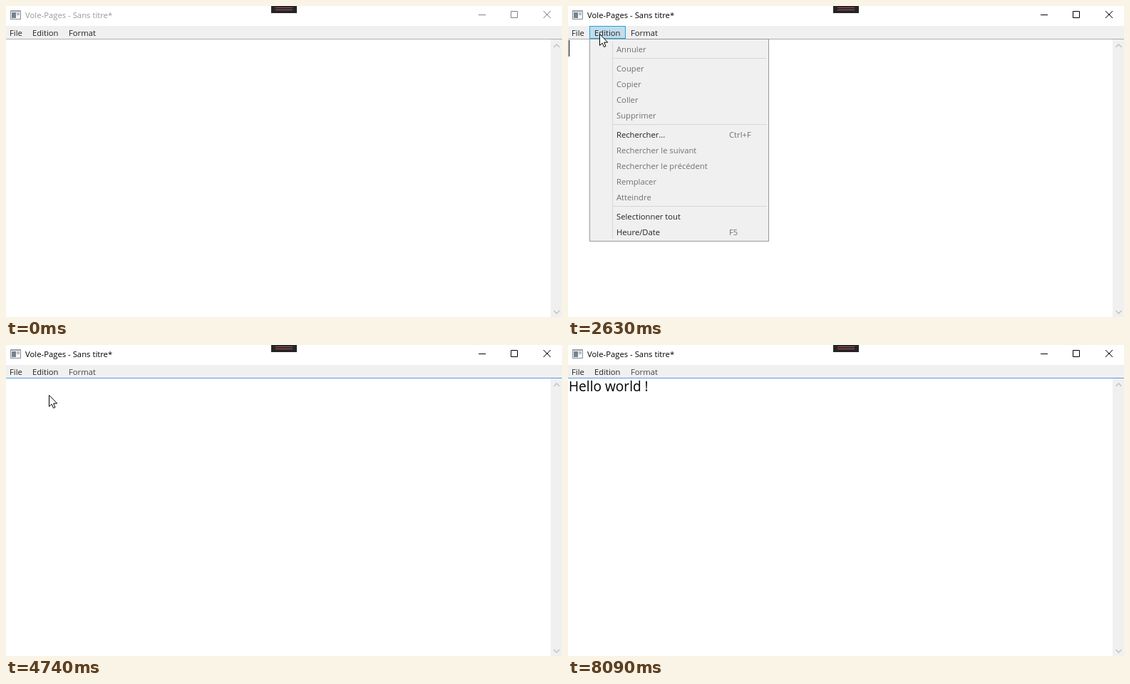
An HTML page for the animation above (8220 ms loop, 780 by 437 pixels).

```html
<!DOCTYPE html>
<html lang="fr">
<head>
<meta charset="utf-8">
<title>Vole-Pages</title>
<style>
html, body { margin: 0; width: 100%; height: 100%; overflow: hidden; background: #fff; }
svg { display: block; width: 100%; height: 100%; }
text { font: 11.25px "Open Sans", "Noto Sans", sans-serif; fill: #212121; white-space: pre; }
.off { fill: #707070; }
#title { font-size: 11.3px; }
#typed { font-size: 19.1px; fill: #000; }
.line { fill: none; stroke-width: 1; }
</style>
</head>
<body>
<svg viewBox="0 0 780 437" id="stage">
  <rect width="780" height="437" fill="#fff"/>
  <g id="icon">
    <rect x="6.5" y="6.5" width="14" height="12" fill="#f4f6f8" stroke="#8b9096"/>
    <rect x="6" y="6" width="15" height="2" fill="#9aa0a6"/>
    <rect x="8" y="9" width="6" height="8" fill="#75828f"/>
    <rect x="15" y="9" width="4" height="4" fill="#b9c0c7"/>
  </g>
  <text id="title" x="27" y="17">Vole-Pages - Sans titre*</text>
  <path id="buttons" class="line" d="M663 12.5h10M708.5 7.5h9v9h-9zM754 7l10 10M764 7l-10 10"/>
  <rect x="372" width="36" height="10" fill="#252526"/>
  <path class="line" stroke="#a8535b" d="M378 2.5h24M378 5.5h24"/>
  <rect y="28" width="780" height="18" fill="#f0f0f0"/>
  <rect id="glow" y="28.5" height="17" fill="#26a0da" fill-opacity=".24" stroke="#26a0da"/>
  <g id="bar"></g>
  <rect id="edge" y="46" width="780" height="1"/>
  <rect x="764" y="47" width="16" height="390" fill="#f0f0f0"/>
  <path class="line" stroke="#bfbfbf" style="stroke-width:1.3" d="M768.5 58l4-4 4 4M768.5 428l4 4 4-4"/>
  <text id="typed" x="1" y="65"></text>
  <rect id="caret" y="48" width="1" height="23"/>
  <g id="popups"></g>
  <path id="arrow" fill="#fff" stroke="#000" d="M.5 .5V16.5L4.1 13.1 6.6 18.6 9 17.5 6.6 12.1H11.7Z"/>
  <path id="beam" class="line" stroke="#000" d="M-3.5-7.5h3M.5-7.5h3M0-7V7M-3.5 7.5h3M.5 7.5h3"/>
</svg>
<script>
const LOOP = 8220;
const $ = id => document.getElementById(id);
const NS = "http://www.w3.org/2000/svg";

function add(parent, tag, attrs, text) {
  const el = document.createElementNS(NS, tag);
  for (const k in attrs) el.setAttribute(k, attrs[k]);
  if (text) el.textContent = text;
  parent.appendChild(el);
  return el;
}

// "-" is a separator, a leading "~" a disabled entry, "|" precedes the shortcut
const MENUS = [
  { name: "File", x: -2, w: 32, tx: 5, pw: 195, keys: 134,
    items: ["New File|Ctrl+N", "~New window", "Open...", "Save", "~Save as...", "-", "Exit|Ctrl+L"] },
  { name: "Edition", x: 30, w: 51, tx: 37, pw: 252, keys: 226,
    items: ["~Annuler", "-", "~Couper", "~Copier", "~Coller", "~Supprimer", "-", "Rechercher...|Ctrl+F",
      "~Rechercher le suivant", "~Rechercher le précédent", "~Remplacer", "~Atteindre", "-",
      "Selectionner tout", "Heure/Date|F5"] },
  { name: "Format", x: 81, w: 51, tx: 88, pw: 248, keys: 0,
    items: ["~Retour automatique à la ligne", "~Police", "~Editeur de style"] }
];

function build(menu) {
  menu.label = add($("bar"), "text", { x: menu.tx, y: 42 }, menu.name);
  const g = menu.popup = add($("popups"), "g", {});
  const seps = menu.items.filter(i => i === "-").length;
  const h = (menu.items.length - seps) * 22 + seps * 5 + 6;
  add(g, "rect", { x: menu.x + .5, y: 46.5, width: menu.pw - 1, height: h - 1 - (seps ? 0 : 0), fill: "#f0f0f0", stroke: "#999" });
  add(g, "rect", { x: menu.x + 32, y: 50, width: 1, height: h - 8, fill: "#d7d7d7" });
  let y = 50;
  for (const item of menu.items) {
    if (item === "-") {
      add(g, "rect", { x: menu.x + 33, y: y + 1, width: menu.pw - 36, height: 1, fill: "#d7d7d7" });
      y += 5;
      continue;
    }
    const [label, key] = item.replace("~", "").split("|");
    add(g, "text", { x: menu.x + 38, y: y + 15, class: item[0] === "~" ? "off" : "" }, label);
    if (key) add(g, "text", { x: menu.keys, y: y + 15, class: "off" }, key);
    y += 22;
  }
}
MENUS.forEach(build);

// Steps: [time, value...]
const POINTER = [
  [0, ""], [200, "beam", 14, 318], [270, "beam", 78, 285], [340, "beam", 136, 250], [410, "beam", 170, 235],
  [940, "beam", 164, 226], [1010, "beam", 140, 194], [1080, "beam", 104, 148], [1150, "beam", 66, 102],
  [1220, "beam", 36, 66], [1290, "arrow", 22, 45], [1350, "arrow", 19, 43], [1560, "arrow", 18, 42],
  [2560, "arrow", 34, 40], [2630, "arrow", 44, 39], [2700, "arrow", 45, 39],
  [3650, "arrow", 51, 39], [3720, "arrow", 66, 40], [3790, "arrow", 86, 41], [3860, "arrow", 102, 41],
  [3930, "arrow", 111, 41], [4390, "arrow", 109, 44], [4460, "arrow", 100, 50], [4530, "arrow", 88, 58],
  [4600, "arrow", 76, 64], [4660, "arrow", 65, 68], [4730, "arrow", 60, 70],
  [4800, "beam", 60.5, 70], [5000, "beam", 60.5, 72], [5800, ""]
];
const HOT = [[0, -1], [1350, 0], [2560, 1], [3790, 2], [4730, -1]];
const OPEN = [[0, -1], [1560, 0], [2560, 1], [3790, 2], [4730, -1]];
const FADE = [[0, 0], [1560, .08], [1630, .43], [1690, .73], [1760, 1]];
const EDGE = [[0, "#abadb3"], [200, "#7eb4ea"], [1350, "#abadb3"], [4730, "#569de5"]];
const CARET = [[0, 0], [1630, 1], [2130, 0], [2630, 1], [3190, 0], [3720, 1], [4260, 0],
  [4800, 1], [5400, 0], [5730, 1], [8090, 0]];
const PHRASE = "Hello world !";
const KEYS = [5730, 5870, 6000, 6150, 6350, 6630, 6830, 6930, 7030, 7130, 7230, 7430, 7480];

const at = (steps, t) => steps.findLast(s => s[0] <= t);
let shown = -1;

function draw(t) {
  const active = t >= 1560;
  $("title").style.fill = active ? "#000" : "#999";
  $("buttons").style.stroke = active ? "#000" : "#808080";
  $("edge").style.fill = at(EDGE, t)[1];

  const hot = MENUS[at(HOT, t)[1]];
  $("glow").style.display = hot ? "" : "none";
  if (hot) {
    $("glow").setAttribute("x", hot.x + .5);
    $("glow").setAttribute("width", hot.w - 1);
  }
  const open = at(OPEN, t)[1];
  MENUS.forEach((m, i) => m.popup.style.opacity = i === open ? at(FADE, t)[1] : 0);
  MENUS[2].label.style.fill = t >= 4730 ? "#444" : "";

  const count = KEYS.filter(k => k <= t).length;
  if (count !== shown) {
    $("typed").textContent = PHRASE.slice(0, count);
    const width = count ? $("typed").getComputedTextLength() : 0;
    $("caret").setAttribute("x", Math.floor(1 + width));
    shown = count;
  }
  $("caret").style.opacity = at(CARET, t)[1];

  const [, kind, x, y] = at(POINTER, t);
  for (const id of ["arrow", "beam"]) {
    $(id).style.display = id === kind ? "" : "none";
    if (id === kind) $(id).setAttribute("transform", `translate(${x} ${y})`);
  }
}

const start = performance.now();
function tick() {
  draw((performance.now() - start) % LOOP);
  requestAnimationFrame(tick);
}
tick();
</script>
</body>
</html>
```
